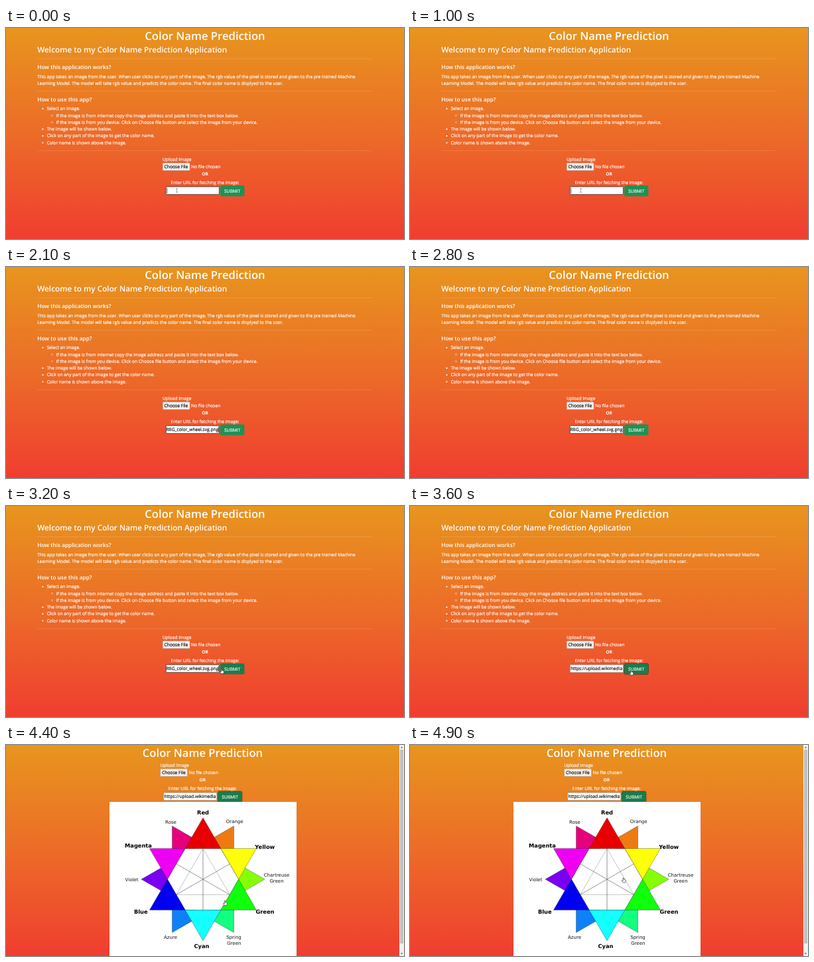
These frames come from a looping animation (600 px wide and 319 px high, 5000 ms). An HTML page:

```html
<!DOCTYPE html>
<html lang="en">
<head>
<meta charset="utf-8">
<title>Color Name Prediction</title>
<style>
  html, body { margin: 0; width: 100%; height: 100%; overflow: hidden; }
  body { background: linear-gradient(#e8951e, #ec6a28 52%, #f03d30); }
  svg { display: block; width: 600px; height: 319px; }
  text {
    font: 6.7px "Open Sans", "Noto Sans", sans-serif; color: #fff; fill: currentColor;
    stroke: currentColor; stroke-width: .17px; text-rendering: geometricPrecision;
  }
  .h1 { font-size: 16.65px; font-weight: 600; }
  .h2 { font-size: 11.77px; font-weight: 600; }
  .h3 { font-size: 8.27px; font-weight: 600; }
  .b { font-weight: 700; }
  .h1, .h2, .h3, .b, .minor, .major { stroke: none; }
  .mid { text-anchor: middle; }
  .end { text-anchor: end; }
  .ink { color: #111; }
  .hr { fill: #fff; opacity: .18; }
  .minor { font: 7px "DejaVu Sans", sans-serif; color: #111; }
  .major { font: bold 8.3px "DejaVu Sans", sans-serif; color: #000; }
</style>
</head>
<body>
<svg id="stage" viewBox="0 0 600 319">
  <defs><clipPath id="field"><rect x="241.5" y="240" width="79.4" height="12"/></clipPath></defs>
  <text class="h1 mid" id="title" x="300" y="17.6">Color Name Prediction</text>
  <g id="intro"></g>
  <g id="form">
    <text x="236" y="200.7">Upload Image</text>
    <rect x="236.2" y="204" width="41" height="11.5" rx="1" fill="#efefef" stroke="#a08a80" stroke-width=".5"/>
    <text class="ink" x="238.6" y="212.2">Choose File</text>
    <text x="279" y="212.4">No file chosen</text>
    <text class="b mid" x="300" y="222.5">OR</text>
    <text class="mid" x="300" y="235.6">Enter URL for fetching the image:</text>
    <rect id="box" x="241.2" y="239.9" width="80.2" height="11.8" rx=".6" fill="#fff"/>
    <g clip-path="url(#field)">
      <text class="ink end" id="tail" x="320.4" y="247.9">RBG_color_wheel.svg.png</text>
      <text class="ink" id="head" x="242.2" y="247.9">https://upload.wikimedia</text>
      <rect id="caret" y="241.6" width=".7" height="8.2" fill="#333"/>
    </g>
    <rect id="button" x="323" y="238" width="36.4" height="16.6" rx="2.4"/>
    <rect id="ring" x="322.9" y="237.9" width="36.6" height="16.8" rx="2" fill="none" stroke="#1c2a20" stroke-width=".8" stroke-dasharray="1.5 1"/>
    <text class="mid" x="341.2" y="248.8">SUBMIT</text>
  </g>
  <g id="result">
    <rect x="156" y="86" width="282" height="233" fill="#fff"/>
    <g id="wheel"></g>
    <rect x="593" width="7" height="319" fill="#f1f1f1"/>
    <rect x="594" y="7" width="5" height="293" fill="#c1c1c1"/>
    <path d="M594.8 4.6h3.4l-1.7-2zM594.8 314.4h3.4l-1.7 2z" fill="#555"/>
  </g>
  <path id="beam" d="M-1.5-3h1L0-2.6.5-3h1M0-2.6v5.2M-1.5 3h1L0 2.6.5 3h1" fill="none" stroke="#777" stroke-width=".7"/>
  <path id="hand" d="M-.9-3Q-.2-3.7.4-3V-.7Q1-1.2 1.5-.5 2-.9 2.4-.2 3-.4 3.2.3V2Q3 3 2.5 4H-.8Q-1.8 2.6-2.7 1.2-2.6.2-1.6.8L-.9 1.5Z" fill="#fff" stroke="#222" stroke-width=".6"/>
</svg>
<script>
const $ = id => document.getElementById(id);

function add(parent, tag, attrs, content = '') {
  const el = document.createElementNS('http://www.w3.org/2000/svg', tag);
  for (const key in attrs) el.setAttribute(key, attrs[key]);
  el.textContent = content;
  parent.append(el);
  return el;
}

const label = (parent, cls, x, y, str) => add(parent, 'text', { class: cls, x, y }, str);

function buildIntro() {
  const intro = $('intro');
  label(intro, 'h2', 47.2, 36.8, 'Welcome to my Color Name Prediction Application');
  label(intro, 'h3', 47.2, 62.3, 'How this application works?');
  label(intro, '', 47.2, 75.5, 'This app takes an image from the user. When user clicks on any part of the image, The rgb value of the pixel is stored and given to the pre trained Machine');
  label(intro, '', 47.2, 85.8, 'Learning Model. The model will take rgb value and predicts the color name. The final color name is displyed to the user.');
  label(intro, 'h3', 47.2, 111.2, 'How to use this app?');
  for (const y of [46, 95.3, 185.2]) add(intro, 'rect', { class: 'hr', x: 47, y, width: 505, height: .7 });
  [
    [0, 'Select an image.'],
    [1, 'If the image is from internet copy the image address and paste it into the text box below.'],
    [1, 'If the image is from you device. Click on Choose file button and select the image from your device.'],
    [0, 'The image will be shown below.'],
    [0, 'Click on any part of the image to get the color name.'],
    [0, 'Color name is shown above the image.']
  ].forEach(([depth, str], i) => {
    const x = 61.4 + depth * 14, y = 124.2 + i * 10.3;
    label(intro, '', x, y, str);
    add(intro, 'circle', {
      cx: x - 6, cy: y - 2.2, r: 1.1, stroke: '#fff',
      'stroke-width': depth ? .4 : 0, fill: depth ? 'none' : '#fff'
    });
  });
}

function buildWheel() {
  const wheel = $('wheel'), R = 93, inner = R / Math.sqrt(3);
  const at = (deg, r) => {
    const a = deg * Math.PI / 180;
    return [297 + r * Math.sin(a), 203 - r * Math.cos(a)].map(v => v.toFixed(2)).join(' ');
  };
  const shape = (points, fill, stroke = '#222') =>
    add(wheel, 'path', { d: `M${points.join('L')}Z`, fill, stroke, 'stroke-width': .35 });
  const tip = (deg, fill) => shape([at(deg, R), at(deg - 30, inner), at(deg + 30, inner)], fill);

  ['#ee7a14', '#86ff06', '#12ff80', '#0e80fa', '#7a00f2', '#e6007c'].forEach((c, i) => tip(30 + i * 60, c));
  shape([30, 90, 150, 210, 270, 330].map(d => at(d, inner)), '#fff');
  ['#e80000', '#ffff08', '#10ff0c', '#14ffff', '#0000f0', '#ee00f2'].forEach((c, i) => tip(i * 60, c));

  const mid = R / 2;
  shape([0, 120, 240].map(d => at(d, mid)), 'none', '#555');
  for (const d of [0, 60, 120]) shape([at(d, mid), at(d + 180, mid)], 'none', '#555');

  [
    ['Red', 297, 105], ['Yellow', 390.3, 157], ['Green', 390.5, 255],
    ['Cyan', 295, 307], ['Blue', 203.3, 255], ['Magenta', 199.5, 155]
  ].forEach(([str, x, y]) => label(wheel, 'major mid', x, y, str));
  [
    ['Rose', 248.5, 119], ['Orange', 344.7, 117.5], ['Chartreuse', 408, 199.3], ['Green', 408, 208.2],
    ['Spring', 343.5, 293], ['Green', 343.8, 302], ['Azure', 248, 292.6], ['Violet', 189.5, 206]
  ].forEach(([str, x, y]) => label(wheel, 'minor mid', x, y, str));
}

const LOOP = 5000, PASTE = 1900, HOVER = 3200, PRESS = 3600, LOAD = 3700;
const TRACK = [
  [0, 257.5, 245.5], [2400, 257.5, 245.5], [2800, 311, 247], [3100, 321, 248.5],
  [3400, 333.5, 251.5], [4200, 333.5, 252.3], [4900, 322, 204]
];

function pointer(t) {
  const i = TRACK.findIndex(step => step[0] > t);
  if (i < 0) return TRACK[TRACK.length - 1].slice(1);
  const [t0, x0, y0] = TRACK[i - 1], [t1, x1, y1] = TRACK[i];
  const k = (t - t0) / (t1 - t0);
  return [x0 + (x1 - x0) * k, y0 + (y1 - y0) * k];
}

const show = (id, on) => $(id).setAttribute('visibility', on ? 'visible' : 'hidden');
const set = (id, attrs) => { for (const key in attrs) $(id).setAttribute(key, attrs[key]); };

function draw(now) {
  const t = Math.floor(now % LOOP / 100) * 100;
  const pasted = t >= PASTE, pressed = t >= PRESS, loaded = t >= LOAD, over = t >= HOVER;
  const caretOn = t < 400 || (t >= 900 && t < 1500) || (t >= PASTE && t < 2500) || (t >= 3000 && t < 3400);

  show('intro', !loaded);
  show('result', loaded);
  set('title', { x: loaded ? 296.5 : 300 });
  set('form', { transform: loaded ? 'translate(-3.6 -168)' : '' });

  show('tail', pasted && !pressed);
  show('head', pressed);
  show('caret', caretOn);
  set('caret', { x: pasted ? 320.2 : 242.6 });
  set('box', { stroke: pressed ? '#777' : '#3a3330', 'stroke-width': pressed ? .6 : .8 });
  set('button', { fill: over ? '#1b7c4c' : '#1f9155' });
  show('ring', pressed);

  const spot = { transform: `translate(${pointer(t).join(' ')})` };
  set('beam', spot);
  set('hand', spot);
  show('beam', t < PASTE || (t >= 2500 && !over));
  show('hand', over);
}

buildIntro();
buildWheel();
const start = performance.now();
(function frame() {
  draw(performance.now() - start);
  requestAnimationFrame(frame);
})();
</script>
</body>
</html>
```
